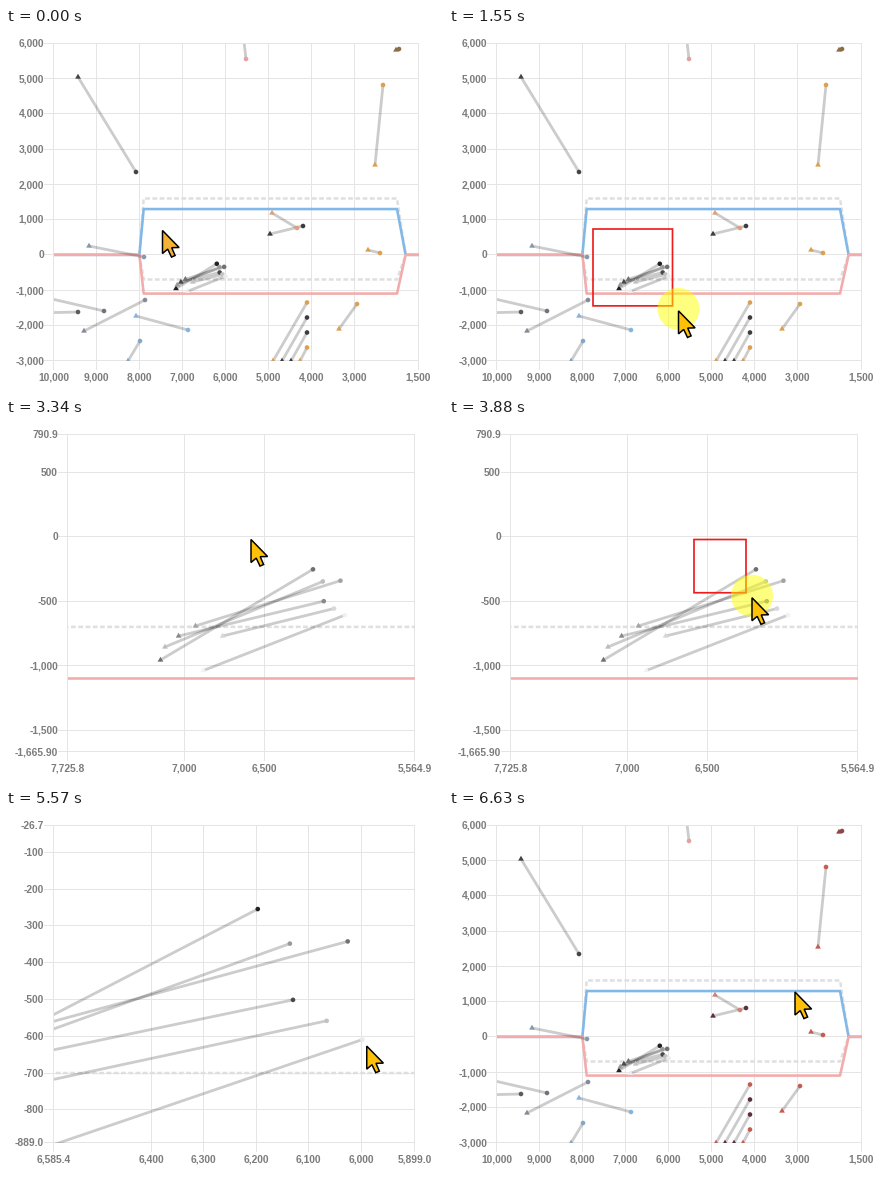
A matplotlib script that plays this animation: 437x363 px, repeating every 7.16 s.

```python
import numpy as np
import matplotlib.pyplot as plt
from matplotlib.animation import FuncAnimation
from matplotlib.colors import LinearSegmentedColormap
from matplotlib.patches import Circle, Polygon, Rectangle, RegularPolygon

W, H, DPI = 437, 363, 100
LOOP, STEP, BEAT = 7160, 20, 67
PX = 72 / DPI
TOP, BOTTOM = 15.5, 332.5

plt.rcParams.update({"font.family": "Liberation Sans", "font.weight": "bold",
                     "path.snap": False})
fig = plt.figure(figsize=(W / DPI, H / DPI), dpi=DPI, facecolor="white")
ax = fig.add_axes([0, 0, 1, 1])
ax.set(xlim=(0, W), ylim=(H, 0))
ax.axis("off")


def ramp(*colors):
    return LinearSegmentedColormap.from_list("ramp", colors)


COOL = ramp("#444444", "#858a96", "#86b4e0")
WARM_EARLY = ramp("#3c3c3c", "#dca050", "#dca050", "#e5a0a0")
WARM_LATE = ramp("#5c3038", "#c45c50", "#c45c50", "#e5a0a0")
RED, BLUE, DASH = "#f3abab", "#82b8e8", "#dfdfdf"

# Tracks run from a triangle (x, y) to a circle (x, y).
# Cluster in data units, darkest first; the others in pixels, along their colour ramp.
CLUSTER = [(7147, -957, 6197, -254), (7034, -771, 6130, -501), (6929, -693, 6026, -342),
           (7119, -856, 6136, -348), (6760, -771, 6066, -558), (6879, -1038, 5998, -609)]
LEFT = [(72, 49, 130, 144), (30, 285, 72, 284), (20, 265, 98, 283), (78, 303, 139, 272),
        (83, 218, 138, 229), (122, 333, 134, 313), (130, 288, 182, 302)]
RIGHT = [(264, 206, 297, 198), (390, 22, 393, 21), (333, 301, 351, 276), (369, 137, 377, 57),
         (362, 222, 374, 225), (266, 185, 291, 200), (237, 5, 240, 31)]


class View:
    """One zoom level of the chart, drawn in stage pixels."""

    def __init__(self, left, right, xticks, yticks, fade=0, warm=None):
        self.left, self.right = left, right
        self.xr = xticks[0], xticks[-1]
        self.yr = yticks[0], yticks[-1]
        self.items = []
        self.clip = Rectangle((left, TOP), right - left, BOTTOM - TOP, transform=ax.transData)
        self.grid(xticks, yticks)
        self.limits()
        if warm:
            self.scatter(warm)
        for row, level in zip(CLUSTER, np.linspace(0.13, 0.92, 6)):
            self.track(self.at(*row[:2]), self.at(*row[2:]), str(level + fade * (1 - level)))

    def at(self, x, y):
        (xa, xb), (ya, yb) = self.xr, self.yr
        return (self.left + (x - xa) / (xb - xa) * (self.right - self.left),
                TOP + (y - ya) / (yb - ya) * (BOTTOM - TOP))

    def add(self, art, clip=True):
        if clip:
            art.set_clip_path(self.clip)
        self.items.append(art)

    def line(self, pts, color, width, clip=True, **kw):
        self.add(ax.plot(*zip(*pts), color=color, lw=width * PX, **kw)[0], clip)

    def text(self, x, y, value, align):
        label = {-1665.9: "-1,665.90"}.get(value, f"{value:,}")
        self.add(ax.text(x, y, label, ha=align, color="#7c7c7c", fontsize=10.3 * PX), False)

    def grid(self, xticks, yticks):
        for v in xticks:
            x = int(self.at(v, 0)[0]) + 0.5
            self.line([(x, TOP), (x, BOTTOM + 9)], "#e5e5e5", 1, False, zorder=1)
            self.text(x, 352, v, "center")
        for v in yticks:
            y = int(self.at(0, v)[1]) + 0.5
            self.line([(self.left - 9, y), (self.right, y)], "#e5e5e5", 1, False, zorder=1)
            self.text(self.left - 9.5, y + 3.5, v, "right")

    def limits(self):
        def band(level):
            return [self.at(x, y) for x, y in
                    [(10000, 0), (8000, 0), (7900, level), (2000, level), (1800, 0), (1500, 0)]]
        for level in (1600, -700):
            self.line(band(level)[1:5], DASH, 2.5, ls=(0, (1.9, 1)), dash_capstyle="butt")
        self.line(band(1300), BLUE, 2.6)
        self.line(band(-1100), RED, 2.6)

    def scatter(self, warm):
        for rows, cmap in ((LEFT, COOL), (RIGHT, warm)):
            for row, u in zip(rows, np.linspace(0, 1, len(rows))):
                self.track(row[:2], row[2:], cmap(u))
        for k in range(4):
            shade = warm((abs(k - 1.5) - 0.5) / 2)
            self.track((267 + 9 * k, 333), (301, 274.5 + 15 * k), shade)

    def track(self, p, q, color):
        self.line([p, q], "black", 2.8, alpha=0.2, solid_capstyle="butt", zorder=3)
        for mark in (RegularPolygon(p, 3, radius=3.3, orientation=np.pi), Circle(q, 2.3)):
            mark.set(fc=color, ec="none", zorder=4)
            self.add(ax.add_patch(mark))

    def show(self, on):
        for art in self.items:
            art.set_visible(on)


WIDE = (47.5, 412.5, [*range(10000, 2999, -1000), 1500], [*range(6000, -3001, -1000)])
SCENES = [
    (0, View(*WIDE, warm=WARM_EARLY)),
    (2120, View(61.5, 408.5, [7725.8, 7000, 6500, 5564.9],
                [790.9, 500, 0, -500, -1000, -1500, -1665.9], fade=0.35)),
    (4950, View(47.5, 408.5, [6585.4, *range(6400, 5999, -100), 5899.0],
                [-26.7, *range(-100, -801, -100), -889.0])),
    (6500, View(*WIDE, warm=WARM_LATE)),
]

# Pointer moves: start, end, x, y; drags also give their release time
HOME = np.array([156.5, 202.5])
MOVES = [(140, 410, 144, 201, None), (1030, 1690, 238, 291, 2120),
         (2730, 3000, 232, 136, None), (3140, 3340, 245, 120.5, None),
         (3610, 4550, 361, 237, 4950), (5570, 6040, 346, 182, None)]

ARROW = np.array([(0, 0), (0, 23), (5.2, 18.6), (9, 26.6), (12.6, 25), (9.2, 17.2), (16.6, 17)])

box = ax.add_patch(Rectangle((0, 0), 1, 1, fill=False, ec="#ee1c1c", lw=1.7 * PX, zorder=6))
halo = ax.add_patch(Circle((0, 0), 21, fc="#ffff00", ec="none", alpha=0.5, zorder=7))
arrow = ax.add_patch(Polygon(ARROW, closed=True, ec="black", lw=1.5 * PX,
                             joinstyle="miter", zorder=8))


def drag_ease(u):
    return np.sin(u * np.pi / 2)


def free_ease(u):
    return u ** 3 * (u * (6 * u - 15) + 10)


def pointer(t):
    """Tip of the pointer, and the pressed corner while dragging."""
    tip, anchor = HOME, None
    for start, end, x, y, release in MOVES:
        if t < start:
            break
        steps = round((end - start) / BEAT) + 1
        u = min(1, ((t - start + 15) // BEAT + 1) / steps)
        anchor = tip if release and t < release else None
        ease = drag_ease if release else free_ease
        tip = tip + (np.array([x, y]) - tip) * ease(u)
    return tip, anchor


def draw(i):
    t = i * STEP + STEP / 2
    now = [view for start, view in SCENES if start <= t][-1]
    for _, view in SCENES:
        view.show(view is now)

    tip, anchor = pointer(t)
    arrow.set_xy(tip + ARROW)
    arrow.set_facecolor("#f4b23a" if t < MOVES[1][0] else "#ffc008")
    halo.center = tip - (0, 2)
    for art in (box, halo):
        art.set_visible(anchor is not None)
    if anchor is not None:
        box.set_bounds(*anchor, *(tip - (6, 5) - anchor))
    return []


anim = FuncAnimation(fig, draw, frames=LOOP // STEP, interval=STEP,
                     repeat=True, repeat_delay=0, blit=False)
plt.show()
```
